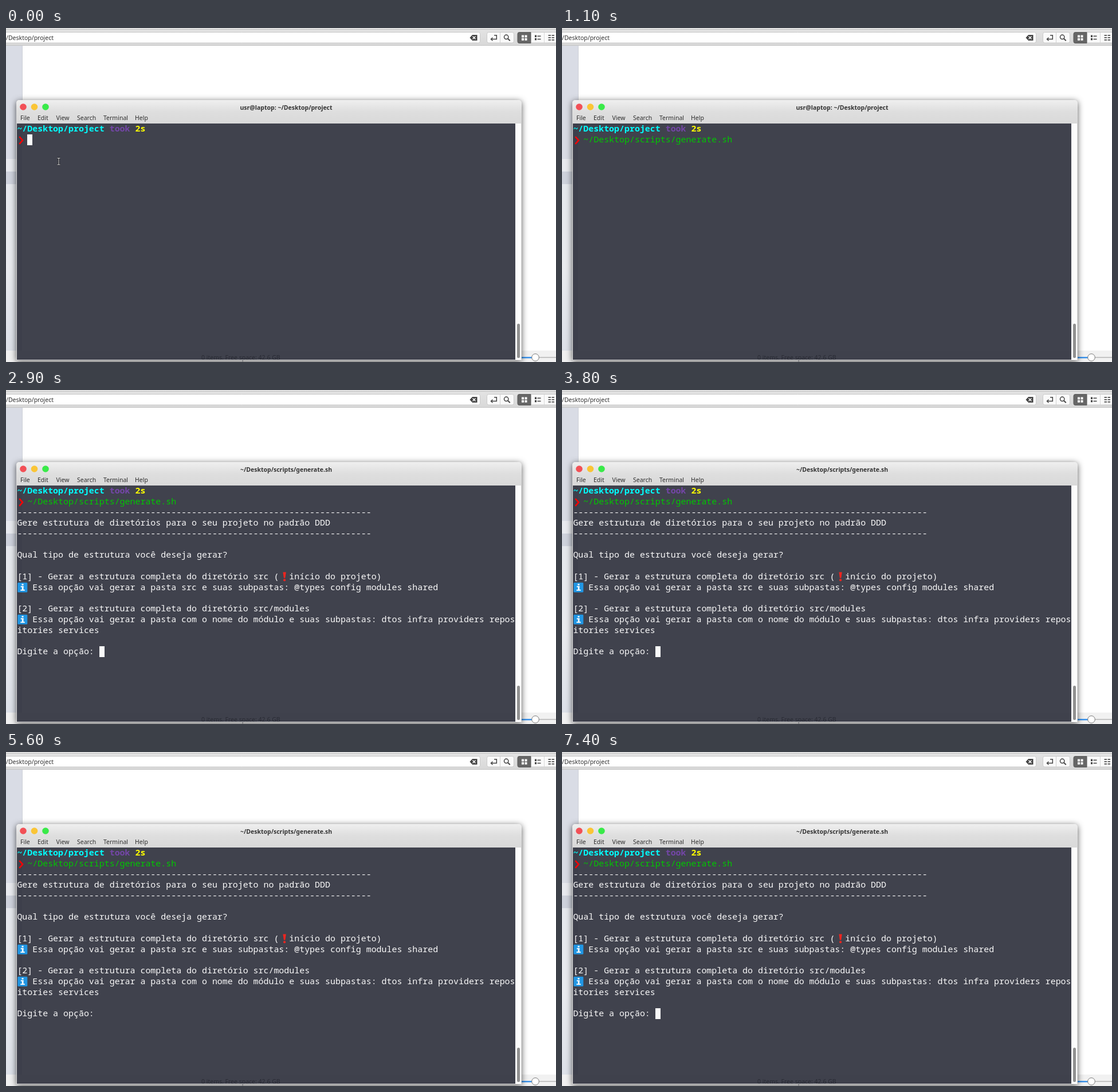
These frames come from a looping animation (960x584 px, 8000 ms). An HTML page with a canvas:

```html
<!DOCTYPE html>
<html lang="en">
<head>
<meta charset="utf-8">
<title>Terminal</title>
<style>
html, body { margin: 0; width: 100%; height: 100%; overflow: hidden; background: #fff; }
canvas { display: block; width: 960px; height: 584px; }
</style>
</head>
<body>
<canvas id="stage" width="960" height="584"></canvas>
<script>
const c = document.getElementById('stage').getContext('2d');
const LOOP = 8000, TYPED = 500, MENU = 2900;
const BLINKS = [300, 500, 1100, 1700, 2300, 2900, 3300, 3800, 4400, 5100, 5600, 6300, 6800, 7400];
const X0 = 19.4, Y0 = 167.3, CELL = 8.96, ROW = 18.73;
const MONO = '14.93px "Noto Sans Mono", "DejaVu Sans Mono", monospace';
const SANS = '10.5px "Noto Sans", "Open Sans", sans-serif';
const RULE = '-'.repeat(69);
const COMMAND = '~/Desktop/scripts/generate.sh';
// Row number, first column, text
const LINES = [
  [2, 0, RULE],
  [3, 0, 'Gere estrutura de diretórios para o seu projeto no padrão DDD'],
  [4, 0, RULE],
  [6, 0, 'Qual tipo de estrutura você deseja gerar?'],
  [8, 0, '[1] - Gerar a estrutura completa do diretório src ('],
  [8, 53, 'início do projeto)'],
  [9, 3, 'Essa opção vai gerar a pasta src e suas subpastas: @types config modules shared'],
  [11, 0, '[2] - Gerar a estrutura completa do diretório src/modules'],
  [12, 3, 'Essa opção vai gerar a pasta com o nome do módulo e suas subpastas: dtos infra providers repos'],
  [13, 0, 'itories services'],
  [15, 0, 'Digite a opção:']
];

function rect(x, y, w, h, fill) {
  c.fillStyle = fill;
  c.fillRect(x, y, w, h);
}

function round(x, y, w, h, r, fill, stroke) {
  c.beginPath();
  c.roundRect(x, y, w, h, r);
  if (fill) { c.fillStyle = fill; c.fill(); }
  if (stroke) { c.strokeStyle = stroke; c.lineWidth = 1; c.stroke(); }
}

function disc(x, y, r, fill, stroke) {
  c.beginPath();
  c.arc(x, y, r, 0, Math.PI * 2);
  c.fillStyle = fill;
  c.fill();
  if (stroke) { c.strokeStyle = stroke; c.lineWidth = 1; c.stroke(); }
}

function path(points, color, width) {
  c.beginPath();
  points.forEach(([x, y], i) => i ? c.lineTo(x, y) : c.moveTo(x, y));
  c.strokeStyle = color;
  c.lineWidth = width;
  c.stroke();
}

function fade(y0, y1, ...colors) {
  const g = c.createLinearGradient(0, y0, 0, y1);
  colors.forEach((k, i) => g.addColorStop(i / (colors.length - 1), k));
  return g;
}

function label(s, x, y, color, font = SANS, align = 'left') {
  c.font = font;
  c.textAlign = align;
  c.fillStyle = color;
  c.fillText(s, x, y);
}

// Terminal text sits on a fixed cell grid
function cells(row, col, s, color, bold) {
  c.font = (bold ? 'bold ' : '') + MONO;
  c.textAlign = 'left';
  c.fillStyle = color;
  const y = Math.round(Y0 + row * ROW + 13.8);
  [...s].forEach((ch, i) => {
    if (ch !== ' ') c.fillText(ch, X0 + (col + i) * CELL, y);
  });
}

function toolbar() {
  rect(0, 0, 960, 31, fade(0, 31, '#e4e4e4', '#d8d8d8'));
  rect(0, 2, 960, 1, '#c2c2c2');
  rect(0, 30, 960, 1, '#c3c3c3');
  round(-6, 7.5, 833.5, 18.5, 3, '#fff', '#cacaca');
  label('/Desktop/project', 0, 21, '#333');

  c.beginPath();
  [[809.5, 17], [814, 12], [822.5, 12], [822.5, 22], [814, 22]].forEach(p => c.lineTo(...p));
  c.closePath();
  c.fillStyle = '#444';
  c.fill();
  path([[814.5, 14.5], [819.5, 19.5]], '#fff', 1.5);
  path([[819.5, 14.5], [814.5, 19.5]], '#fff', 1.5);

  round(839.5, 7.5, 47, 18.5, 3, '#fafafa', '#cacaca');
  rect(862, 8, 1, 18, '#d2d2d2');
  path([[852, 12.7], [856.3, 12.7], [856.3, 19.5], [847, 19.5]], '#444', 1.5);
  path([[849.5, 16.8], [846.5, 19.5], [849.5, 22.2]], '#444', 1.5);
  c.beginPath();
  c.arc(873.2, 15.8, 3.7, 0, Math.PI * 2);
  c.stroke();
  path([[876, 18.6], [879.7, 22.3]], '#444', 2);

  round(893.5, 7.5, 80, 18.5, 3, '#fafafa', '#cacaca');
  round(893, 7.5, 23, 19, [3, 0, 0, 3], '#666', '#5b5b5b');
  rect(939, 8, 1, 18, '#d8d8d8');
  for (const y of [12.5, 17.8]) {
    for (const x of [900, 905.5]) rect(x, y, 4, 4, '#fff');
    rect(923, y, 3, 3.5, '#444');
    rect(927.5, y + 1, 6, 1.5, '#444');
  }
  for (const y of [12, 16, 20])
    for (const x of [946.5, 952.5]) rect(x, y, 4.5, 1.8, '#555');
}

function backdrop() {
  rect(0, 0, 960, 584, '#fff');
  toolbar();
  rect(0, 31, 28, 553, '#d9dce5');
  rect(0, 229, 28, 22, '#e8eaef');
  rect(0, 251, 28, 22, '#ced2dc');
  rect(0, 273, 28, 291, fade(273, 564, '#e5e8ed', '#e9ebef', '#dde1e9'));
  rect(28, 31, 1, 533, '#cfd2d8');
  rect(0, 564, 960, 20, '#f1f1f1');
  rect(898, 575, 20, 2.5, '#3a92ea');
  rect(930, 575, 30, 2, '#c4c4c4');
  disc(924, 576, 6.3, '#fff', '#777');
}

function frame(title) {
  c.save();
  c.shadowColor = 'rgba(0,0,0,.65)';
  c.shadowBlur = 11;
  c.shadowOffsetY = 2;
  round(18, 126, 882, 455, [5, 5, 0, 0], '#dcdcdc');
  c.restore();
  round(18, 126, 882, 455, [5, 5, 0, 0], fade(126, 167, '#efefef', '#dedede', '#d9d9d9'));
  disc(30, 138, 5.8, '#f25056');
  disc(49.5, 138, 5.8, '#fac536');
  disc(69, 138, 5.8, '#39ea49');
  label(title, 489, 143, '#333', 'bold ' + SANS, 'center');
  [['File', 25], ['Edit', 55], ['View', 87.5], ['Search', 124], ['Terminal', 170], ['Help', 225]]
    .forEach(([s, x]) => label(s, x, 161, '#2e2e2e'));

  rect(19, 167, 870, 413, '#40424d');
  rect(19, 167, 9, 413, '#3d3f4b');
  rect(19, 564, 870, 16, '#3f414c');
  label('0 items, Free space: 42.6 GB', 341, 580, '#292b34');
  rect(889, 167, 10, 413, '#fcfcfc');
  round(892, 517, 5, 60, 2.5, '#919191');
  rect(18, 580, 882, 1, '#e2e2e2');
}

function info(row) {
  const y = Y0 + row * ROW;
  round(20.3, y + 0.8, 17, 17, 1.5, '#2196e3');
  rect(27.5, y + 3, 3, 2.6, '#fff');
  rect(25.8, y + 7, 4.7, 1.8, '#fff');
  rect(27.8, y + 7, 2.7, 7.5, '#fff');
  rect(25.3, y + 13.2, 7.5, 1.8, '#fff');
}

function alertMark() {
  c.beginPath();
  [[483.4, 318.5], [488.8, 318.5], [487.3, 328.8], [484.9, 328.8]].forEach(p => c.lineTo(...p));
  c.closePath();
  c.fillStyle = '#f0251f';
  c.fill();
  disc(486.1, 332.3, 2.1, '#f0251f');
}

function pointer() {
  const beam = (color, w) => {
    path([[92, 227.5], [92, 239]], color, w);
    path([[89.5, 227.5], [94.5, 227.5]], color, w);
    path([[89.5, 239], [94.5, 239]], color, w);
  };
  beam('#15161b', 2.8);
  beam('#e8e8e8', 1);
}

function draw(t) {
  const typed = t >= TYPED, menu = t >= MENU;
  backdrop();
  frame(menu ? COMMAND : 'usr@laptop: ~/Desktop/project');
  cells(0, 0, '~/Desktop/project', '#00ffff', true);
  cells(0, 18, 'took', '#7446a8', true);
  cells(0, 23, '2s', '#ffff00', true);
  path([[23.3, 190], [29, 196.3], [23.3, 202.8]], '#ff0000', 2.6);
  if (typed) cells(1, 2, COMMAND, '#00c800');
  else pointer();
  if (menu) {
    LINES.forEach(([row, col, s]) => cells(row, col, s, '#fafafa'));
    info(9);
    info(12);
    alertMark();
  }
  const [row, col] = menu ? [15, 16] : [1, typed ? 2 + COMMAND.length : 2];
  const flips = BLINKS.filter(b => b <= t).length;
  if (flips % 2 === 0)
    rect(Math.round(X0 + col * CELL), Math.round(Y0 + row * ROW), 9, 19, '#fafafa');
}

const start = performance.now();
function tick(now) {
  draw(Math.max(0, now - start) % LOOP);
  requestAnimationFrame(tick);
}
draw(0);
requestAnimationFrame(tick);
</script>
</body>
</html>
```
